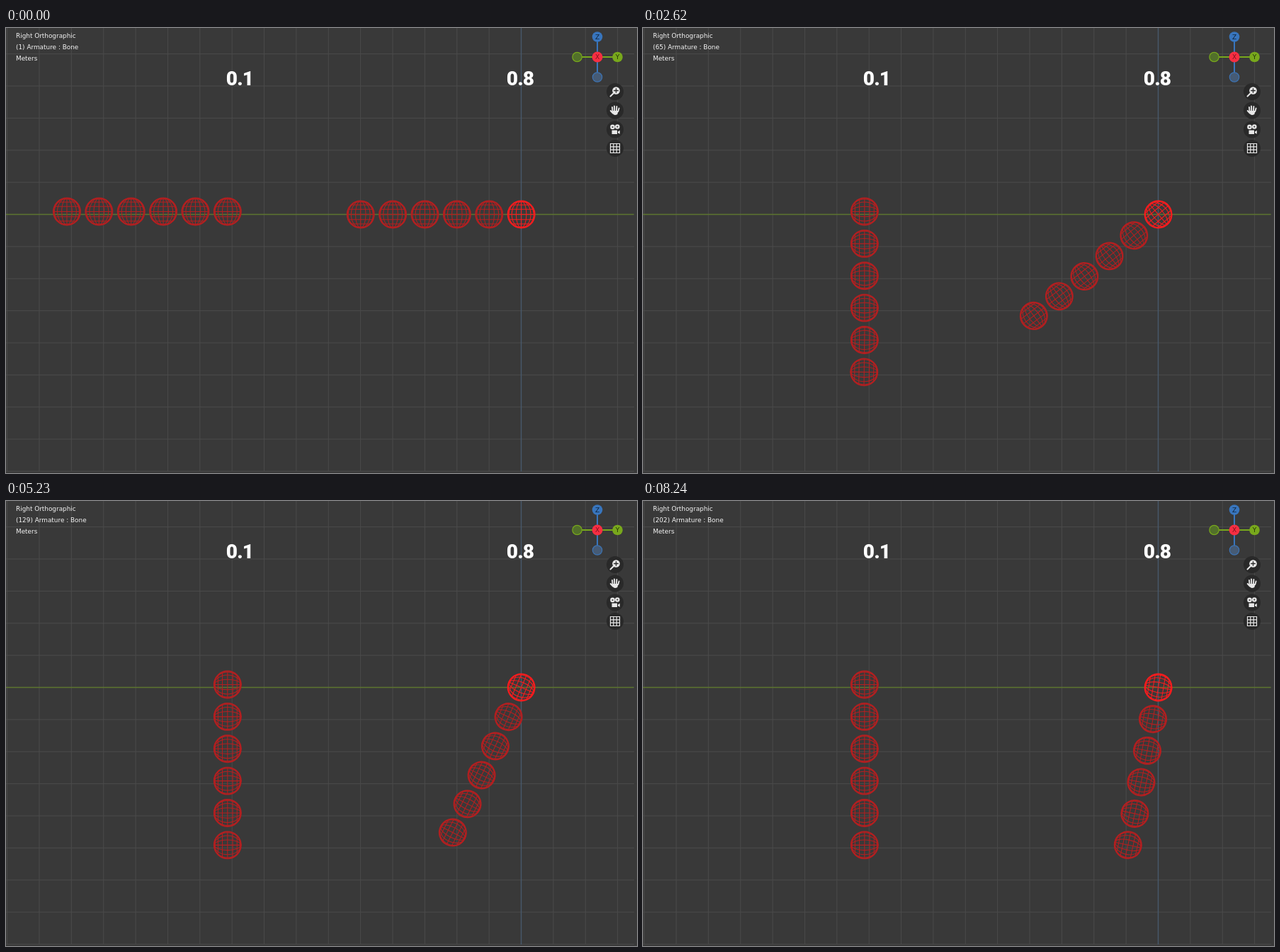
An HTML page that plays this animation: 891x629 px, repeating every 8270 ms.

```html
<!DOCTYPE html>
<html lang="en">
<head>
<meta charset="utf-8">
<title>Bone chains</title>
<style>
  html, body { margin: 0; width: 100%; height: 100%; overflow: hidden; background: #393939; }
  svg { display: block; width: 891px; height: 629px; }
  text { font-family: "DejaVu Sans", sans-serif; }
  .info { font-size: 8.9px; fill: #f4f4f4; }
  .value { font: 900 28px Roboto, "Open Sans", sans-serif; font-stretch: 75%; letter-spacing: -.8px; fill: #fff; text-anchor: middle; }
  .axis { font-size: 9px; text-anchor: middle; }
  .ball { fill: none; stroke: #b41f20; stroke-width: 1.05; }
  .ball.active { stroke: #f81c1e; }
  .icon { fill: #e8e8e8; stroke: #e8e8e8; stroke-linecap: round; stroke-linejoin: round; }
</style>
</head>
<body>
<svg viewBox="0 0 891 629">
  <defs>
    <g id="ball"></g>
  </defs>
  <path id="grid" fill="none" stroke="#4b4b4b"/>
  <path d="M0 263.5H886.5" stroke="#5d752f" stroke-width="1.5"/>
  <path d="M727.5 0V627" stroke="#48596c" stroke-width="1.4"/>

  <g id="chains"></g>

  <g class="info">
    <text x="14" y="14.2">Right Orthographic</text>
    <text x="14" y="30.2" id="count"></text>
    <text x="14" y="46.2">Meters</text>
  </g>
  <text class="value" x="330" y="81">0.1</text>
  <text class="value" x="726" y="81">0.8</text>

  <g stroke-width="2">
    <path d="M835 41V12.500" stroke="#3875bd"/>
    <path d="M835 41V64" stroke="#3875bd"/>
    <path d="M812 41H863" stroke="#78a81c"/>
    <g stroke-width="1.2">
      <circle cx="835" cy="69.500" r="6.700" fill="#465b75" stroke="#3d73b2"/>
      <circle cx="806.500" cy="41" r="6.700" fill="#52702a" stroke="#78a81c"/>
    </g>
    <circle cx="835" cy="12.500" r="7.300" fill="#3875bd"/>
    <circle cx="863.500" cy="41" r="7.300" fill="#78a81c"/>
    <circle cx="835" cy="41" r="7.500" fill="#f62e42"/>
  </g>
  <g class="axis">
    <text x="835" y="15.800" fill="#10233a">Z</text>
    <text x="863.500" y="44.300" fill="#243506">Y</text>
    <text x="835" y="44.300" fill="#7d1420">X</text>
  </g>

  <g fill="#292929">
    <circle cx="860" cy="90" r="12"/>
    <circle cx="860" cy="116.500" r="12"/>
    <circle cx="860" cy="143.500" r="12"/>
    <circle cx="860" cy="170" r="12"/>
  </g>
  <g class="icon" transform="translate(860 90)">
    <path d="M-2.500 2.500L-6.500 6.500" stroke-width="2"/>
    <circle cx="1.500" cy="-1.500" r="5.300" stroke="none"/>
    <path d="M1.500 -4.300V1.300M-1.300 -1.500H4.300" stroke="#292929" stroke-width="1.300"/>
  </g>
  <g class="icon" transform="translate(860 116.500)">
    <path d="M-3.500 1L-4 -4.500M-.8 0L-1 -6M2 0L2.400 -5.500M4.300 1.500L5.600 -3M-3 4L-6.300 .5" fill="none" stroke-width="1.900"/>
    <path d="M-4 .5H4.700L3.300 5.500Q0 7.500 -2.500 5.500Z" stroke="none"/>
  </g>
  <g class="icon" transform="translate(860 143.500)" stroke="none">
    <circle cx="-3.500" cy="-3.600" r="3.300" stroke="none"/>
    <circle cx="3.300" cy="-4" r="3.300" stroke="none"/>
    <circle cx="-3.500" cy="-3.600" r="1" fill="#292929" stroke="none"/>
    <circle cx="3.300" cy="-4" r="1" fill="#292929" stroke="none"/>
    <path d="M-4.500 1H3V6.500H-4.500ZM4 3L6.800 1.300V6.300L4 4.700Z" stroke="none"/>
  </g>
  <path transform="translate(860 170)" d="M-6.500 -6.500H6.500V6.500H-6.500ZM-2.200 -6.500V6.500M2.200 -6.500V6.500M-6.500 -2.200H6.500M-6.500 2.200H6.500" fill="none" stroke="#e8e8e8" stroke-width="1.200"/>
</svg>

<script>
const LOOP = 8270, STEP = 41, CELL = 45.37, RADIUS = 19, JOINTS = 6;
const RAD = Math.PI / 180;
const $ = id => document.getElementById(id);

function drawGrid() {
  let d = "";
  for (let k = -16; k <= 3; k++) d += `M${727.5 + k * CELL} 0V627`;
  for (let k = -5; k <= 8; k++) d += `M0 ${263.5 + k * CELL}H887`;
  $("grid").setAttribute("d", d);
}

// Wire sphere seen from the side: parallels are chords, meridians are ellipses.
function drawBall() {
  let s = `<circle r="${RADIUS}" stroke-width="1.9"/><path d="M0 ${-RADIUS}V${RADIUS}"/>`;
  for (let k = -3; k <= 3; k++) {
    const a = k * 22.5 * RAD, y = RADIUS * Math.sin(a), x = RADIUS * Math.cos(a);
    s += `<path d="M${-x} ${y}H${x}"/>`;
    if (k > 0) s += `<ellipse rx="${y}" ry="${RADIUS}"/>`;
  }
  $("ball").innerHTML = s;
}

// Loose chain: bone angles below the horizontal, in degrees, by step.
const fall = [
  [0, 0, 0, 0, 0, 0],
  [4, 13, 4, 1, 0, 0],
  [8, 50, 20, 7, 2, 0],
  [12, 80, 53, 26, 11, 4],
  [16, 91.3, 81.8, 59.5, 37.4, 19.2],
  [20, 92, 91, 80, 60, 42],
  [26, 90.5, 92, 93, 90, 84],
  [32, 90, 90.5, 93, 99, 108],
  [42, 90, 89.4, 88.1, 92.5, 102.7],
  [52, 90, 90, 89, 88.5, 91],
  [64, 90, 90, 90, 90, 89.3],
  [78, 90, 90, 90, 90, 90]
];

function slope(i, bone) {
  const a = fall[i - 1], b = fall[i + 1];
  return a && b ? (b[bone] - a[bone]) / (b[0] - a[0]) : 0;
}

function looseAngle(n, bone) {
  const j = fall.findIndex(row => row[0] > n);
  if (j < 0) return 90;
  const a = fall[j - 1], b = fall[j], h = b[0] - a[0], u = (n - a[0]) / h, v = 1 - u;
  return a[bone] * v * v * (1 + 2 * u) + b[bone] * u * u * (3 - 2 * u)
    + h * u * v * (v * slope(j - 1, bone) - u * slope(j, bone));
}

// Stiff chain: overdamped pendulum, each bone a little slower than its parent.
function stiffAngle(n, bone) {
  const rate = 0.01235 - 0.0003 * (bone - 1);
  return 2 * Math.atan(Math.tanh(rate * Math.max(0, n - 0.6) / 2)) / RAD;
}

function makeChain(x, y, angle, active) {
  const balls = Array.from({ length: JOINTS }, (_, i) => {
    const use = document.createElementNS("http://www.w3.org/2000/svg", "use");
    use.setAttribute("href", "#ball");
    use.setAttribute("class", active && i === 0 ? "ball active" : "ball");
    $("chains").append(use);
    return use;
  });
  return n => {
    let px = x, py = y;
    balls.forEach((ball, i) => {
      const a = angle(n, Math.min(i + 1, JOINTS - 1));
      ball.setAttribute("transform", `translate(${px} ${py}) rotate(${-a})`);
      px -= CELL * Math.cos(a * RAD);
      py += CELL * Math.sin(a * RAD);
    });
  };
}

drawGrid();
drawBall();
const chains = [
  makeChain(312.8, 259.5, looseAngle, false),
  makeChain(727.6, 263.5, stiffAngle, true)
];

// Short holds where the playback skips a beat.
const holds = [[0, 50], [1700, 1760], [3550, 3620]];

function stepAt(t) {
  const hold = holds.find(([from, to]) => t >= from && t < to);
  return Math.floor((hold ? hold[0] : t) / STEP + 0.56);
}

let start, shown = -1;
function tick(now) {
  start ??= now;
  const n = stepAt((now - start) % LOOP);
  if (n !== shown) {
    shown = n;
    $("count").textContent = `(${n + 1}) Armature : Bone`;
    chains.forEach(pose => pose(n));
  }
  requestAnimationFrame(tick);
}
requestAnimationFrame(tick);
</script>
</body>
</html>
```
